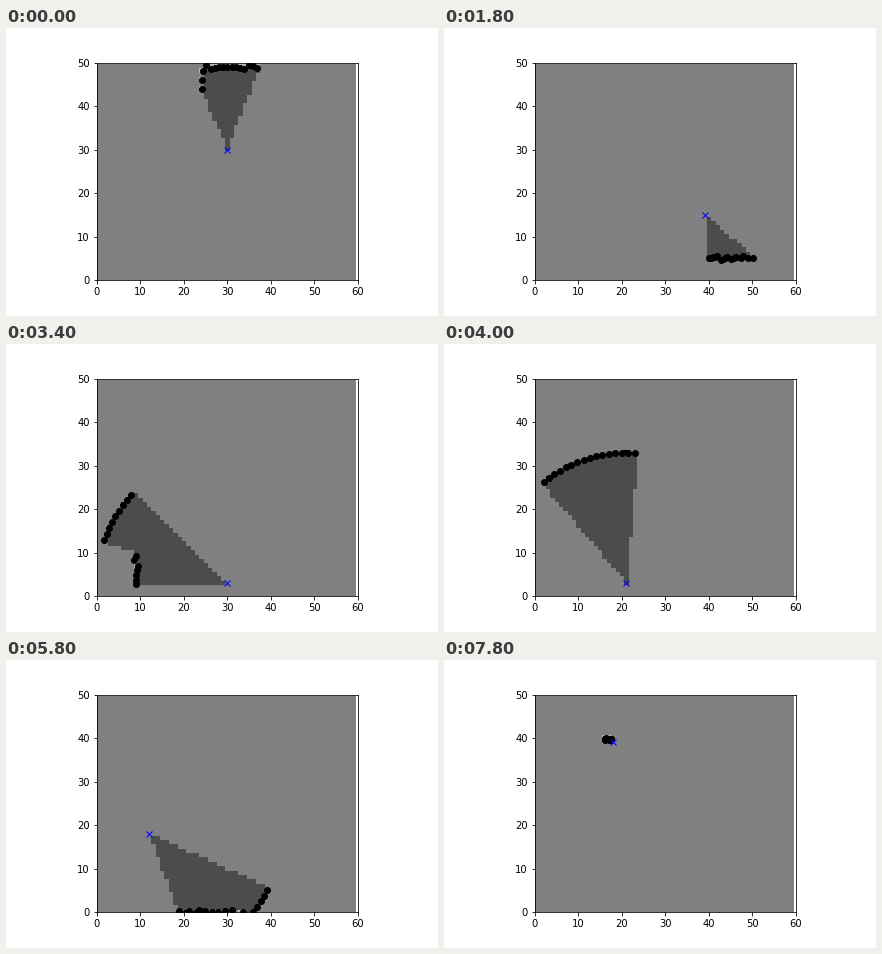
A matplotlib script for the animation above (8000 ms loop, 432 by 288 pixels).

```python
import math

import matplotlib.pyplot as plt
import numpy as np
from matplotlib.animation import FuncAnimation

ROWS, COLS = 50, 60
STEPS = 40
R_MAX = 30
DEPTH, BEAM = 1.0, 0.05   # wall thickness and beam width of the sensor model
TURN = 0.3                # sensor rotation per step, radians
PHI = np.arange(-0.4, 0.4, BEAM)
MOVES = [(3, 0), (0, 3), (-3, 0), (0, -3)]

world = np.zeros((ROWS, COLS), dtype=bool)
for r0, r1, c0, c1 in [(0, 10, 0, 10), (30, 35, 40, 45), (3, 6, 40, 60),
                       (20, 30, 25, 29), (40, 50, 5, 25)]:
    world[r0:r1, c0:c1] = True


def blocked(row, col):
    outside = row <= 0 or row >= ROWS - 1 or col <= 0 or col >= COLS - 1
    return outside or world[row, col]


def drive():
    """Walk straight ahead; at an obstacle, wait one step and turn."""
    row, col, heading, theta = 30, 30, 1, 0.0
    poses = [(row, col, theta)]
    for _ in range(STEPS - 1):
        dr, dc = MOVES[heading]
        if blocked(row + dr, col + dc):
            heading = (heading + 1) % 4
        else:
            row, col = row + dr, col + dc
        theta = (theta + TURN) % (2 * math.pi)
        poses.append((row, col, theta))
    return poses


def cast(row, col, angle):
    for r in range(1, R_MAX + 1):
        if blocked(round(row + r * math.cos(angle)),
                   round(col + r * math.sin(angle))):
            return r
    return R_MAX


def scan_grid(row, col, theta, ranges):
    """Occupancy probability of every cell for a single scan."""
    i, j = np.mgrid[:ROWS, :COLS]
    dist = np.hypot(i - row, j - col)
    phi = (np.arctan2(j - col, i - row) - theta + np.pi) % (2 * np.pi) - np.pi
    gap = np.abs(phi[..., None] - PHI)
    hit = ranges[gap.argmin(axis=2)]
    unseen = (dist > np.minimum(R_MAX, hit + DEPTH / 2)) | (gap.min(axis=2) > BEAM / 2)
    wall = (hit < R_MAX) & (np.abs(dist - hit) < DEPTH / 2)
    return np.select([unseen, wall, dist < hit], [0.5, 0.7, 0.3], 0.0)


plt.rcParams.update({"font.family": "DejaVu Sans", "font.size": 10})
fig = plt.figure(figsize=(6, 4), dpi=72, facecolor="white")
fig.subplots_adjust(left=0.125, right=0.9, bottom=0.125, top=0.88)
ax = fig.add_subplot()
ax.set_xlim(0, COLS)
ax.set_ylim(0, ROWS)
image = ax.imshow(np.full((ROWS, COLS), 0.5), cmap="gray", origin="lower",
                  vmin=0, vmax=1)
hits, = ax.plot([], [], "ko")
robot, = ax.plot([], [], "bx")
ax.set_xlim(0, COLS)
ax.set_ylim(0, ROWS)

poses = drive()


def draw(n):
    row, col, theta = poses[n]
    angles = PHI + theta
    ranges = np.array([cast(row, col, a) for a in angles], dtype=float)
    image.set_data(scan_grid(row, col, theta, ranges))
    hits.set_data(col + ranges * np.sin(angles), row + ranges * np.cos(angles))
    robot.set_data([col], [row])
    return image, hits, robot


anim = FuncAnimation(fig, draw, frames=STEPS, interval=200, repeat=True,
                     repeat_delay=0)
plt.show()
```
